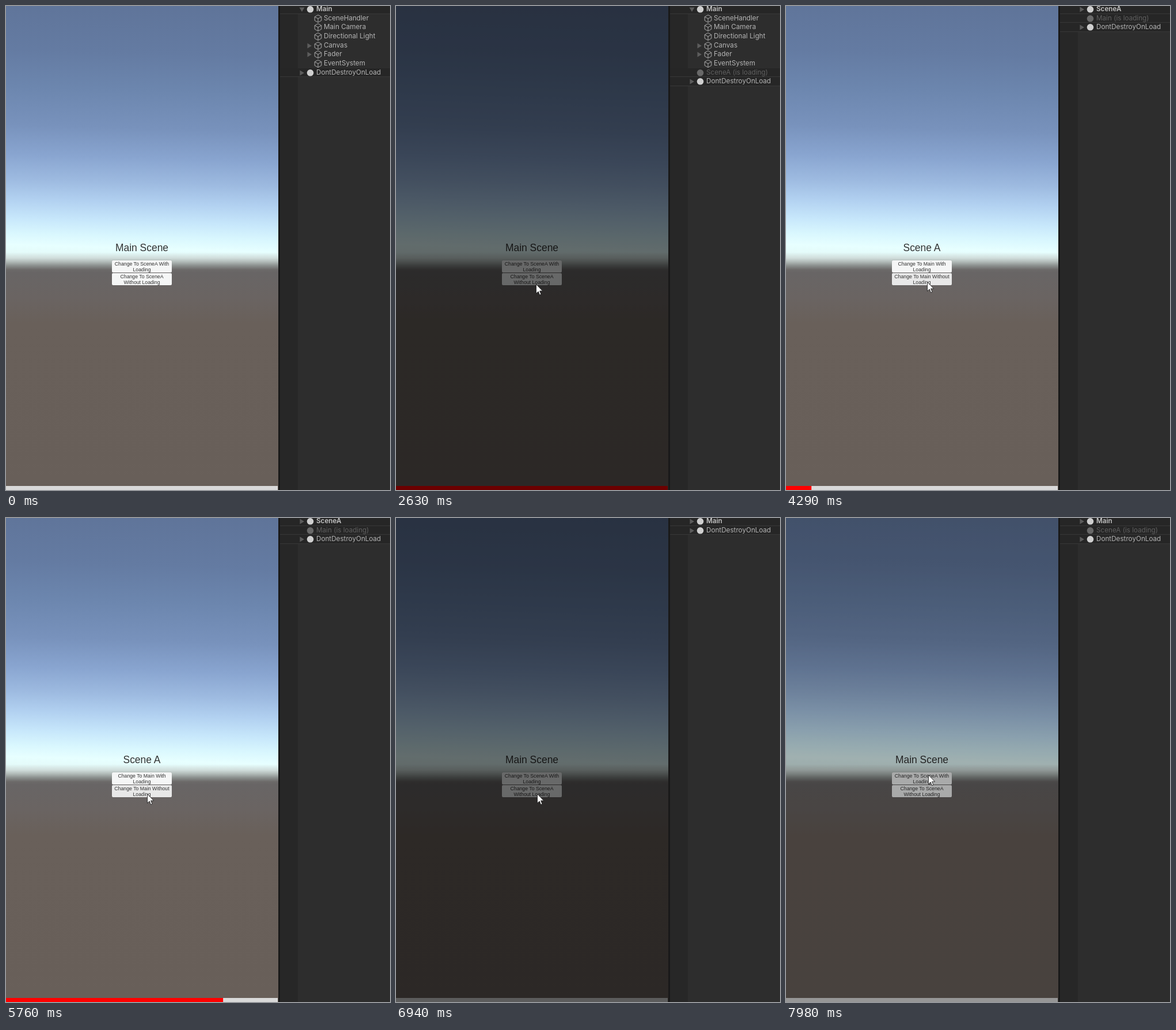
An HTML page that plays this animation: 667x839 px, repeating every 8000 ms.

```html
<!DOCTYPE html>
<html lang="en">
<head>
<meta charset="utf-8">
<title>Scene change</title>
<style>
  html, body { margin: 0; width: 100%; height: 100%; overflow: hidden; background: #2c2c2c; }
  #stage { position: relative; width: 667px; height: 839px; overflow: hidden; }
  #stage * { box-sizing: border-box; }
  .abs { position: absolute; }
  .anim { animation: 8s linear infinite; }

  /* Game view */
  #game { left: 0; top: 0; width: 473px; height: 839px; overflow: hidden; background:
    linear-gradient(180deg, transparent 427px, #d0dddb 437px, #aeb7b4 444px, #8b908e 450px, #6c6a69 457px, #686565 462px, #6a6462 505px, #69605a 550px, #685f59 839px),
    linear-gradient(181.7deg, #5f7499 0, #647ba2 88px, #6c86ae 152px, #7892bc 219px, #89a5d0 271px, #9dbae0 313px, #b1d0f0 347px, #c7e7fb 381px, #d9f7fe 407px, #e7ffff 427px, #e2f8f6 450px); }
  #scenes { left: 0; top: 0; animation-name: scenes; animation-timing-function: step-end; }
  .view { left: 0; top: 0; width: 473px; height: 839px; color: #323232;
    font-family: "Liberation Sans", Arial, sans-serif; text-align: center; }
  .view + .view { left: 473px; }
  .title { left: 0; top: 409px; width: 472px; font-size: 17.45px; line-height: 20px; white-space: nowrap; }
  .btn { left: 184px; width: 104px; height: 21px; border-radius: 2px; background: #f5f6f6;
    box-shadow: 0 0 1px rgba(60,60,60,.3); font-size: 8.73px; line-height: 10px; padding-top: .5px; white-space: nowrap; }
  .hover { animation-name: hover; animation-timing-function: step-end; }
  #track { left: 0; top: 831.5px; width: 472px; height: 7.5px; background: #d9d9d9; }
  #bar { left: 0; top: 0; width: 100%; height: 100%; background: #f00; transform-origin: 0 0; animation-name: load; }
  #fade { left: 0; top: 0; width: 473px; height: 839px; background: #000; animation-name: fade; }
  #cursor { left: 0; top: 0; overflow: visible; animation-name: cursor; }

  /* Hierarchy panel */
  #panel { left: 473px; top: 0; width: 194px; height: 839px; overflow: hidden;
    background: linear-gradient(90deg, #191919 3px, #272727 3px, #272727 34px, #2d2d2d 34px); }
  #lists { left: 0; top: 0; animation-name: lists; animation-timing-function: step-end; }
  .list { top: -1.9px; width: 194px; font: 11.7px Inter, sans-serif; color: #b4b4b4; }
  .row { position: relative; height: 15.65px; line-height: 15.65px; white-space: nowrap; }
  .row svg { position: absolute; left: 0; top: 0; width: 80px; height: 15.65px; }
  .row span { position: absolute; left: 79px; }
  .scene { margin-left: 3px; left: 0; background: #262626; border-bottom: 1px solid #383838; }
  .scene svg { left: -3px; }
  .scene span { left: 63px; }
  .open span { font-weight: 600; color: #c4c4c4; }
  .loading { color: #5f5f5f; }

  @keyframes scenes { 0% { transform: none; } 35.37% { transform: translateX(-473px); } 85.87%, 100% { transform: none; } }
  @keyframes hover { 0% { background: #f5f6f6; } 44.5% { background: #e8e8e8; } 85.87%, 100% { background: #f5f6f6; } }
  @keyframes load {
    0%, 13% { transform: scaleX(0); }
    26.94%, 35.37% { transform: scaleX(1); }
    35.38%, 51.2% { transform: scaleX(0); }
    77.25%, 85.87% { transform: scaleX(1); }
    85.88%, 100% { transform: scaleX(0); }
  }
  @keyframes fade {
    0%, 26.94% { opacity: 0; }
    33.75%, 35.37% { opacity: .66; }
    42.08%, 77.25% { opacity: 0; }
    84.25%, 85.87% { opacity: .66; }
    92.7%, 96.46% { opacity: 0; }
    100% { opacity: .334; }
  }
  @keyframes cursor {
    0%, 1.4% { transform: translate(458px, 845px); animation-timing-function: cubic-bezier(.3, .3, .5, 1); }
    9.5%, 44% { transform: translate(243px, 482px); }
    50%, 93% { transform: translate(245px, 478px); }
    95.6%, 100% { transform: translate(247px, 445px); }
  }
  @keyframes lists {
    0% { transform: none; }
    13% { transform: translateX(-194px); }
    35.37% { transform: translateX(-388px); }
    51.2% { transform: translateX(-582px); }
    85.87% { transform: translateX(-776px); }
    96.4%, 100% { transform: translateX(-970px); }
  }
</style>
</head>
<body>
<div id="stage">
  <div id="game" class="abs">
    <div id="scenes" class="abs anim">
      <div class="abs view">
        <div class="abs title">Main Scene</div>
        <div class="abs btn" style="top:441px">Change To SceneA With<br>Loading</div>
        <div class="abs btn" style="top:463px">Change To SceneA<br>Without Loading</div>
      </div>
      <div class="abs view">
        <div class="abs title">Scene A</div>
        <div class="abs btn" style="top:441px">Change To Main With<br>Loading</div>
        <div class="abs btn hover anim" style="top:463px">Change To Main Without<br>Loading</div>
      </div>
    </div>
    <div id="track" class="abs"><div id="bar" class="abs anim"></div></div>
    <div id="fade" class="abs anim"></div>
    <svg id="cursor" class="abs anim" width="12" height="20">
      <path d="M.5 .5V16.3L4.2 12.9 6.6 18.8 9 17.8 6.6 12H11.6Z" fill="#fff" stroke="#222" stroke-width=".9"/>
    </svg>
  </div>
  <div id="panel" class="abs"><div id="lists" class="abs anim"></div></div>
</div>
<script>
  const DOWN = x => `<path d="M${x - 4.5} 4.5h9l-4.5 7.5z" fill="#5c5c5c"/>`;
  const RIGHT = x => `<path d="M${x - 3.5} 3.5v9l7.5-4.5z" fill="#5c5c5c"/>`;
  const DOT = c => `<circle cx="55.5" cy="7.8" r="5.8" fill="${c}"/>`;
  const CUBE = '<path d="M69 1.6l5.8 3.1v6.5l-5.8 3.2-5.8-3.2V4.7zM63.2 4.7l5.8 3.2 5.8-3.2M69 7.9v6.5" fill="none" stroke="#aaa"/>';

  const row = (cls, art, text) => `<div class="row ${cls}"><svg>${art}</svg><span>${text}</span></div>`;
  const open = (name, arrow = RIGHT) => row('scene open', arrow(41) + DOT('#cfcfcf'), name);
  const loading = name => row('scene loading', DOT('#686868'), name + ' (is loading)');
  const child = (name, nested) => row('', (nested ? RIGHT(54) : '') + CUBE, name);

  const keep = row('scene', RIGHT(41) + DOT('#cfcfcf'), 'DontDestroyOnLoad');
  const main = open('Main', DOWN) + child('SceneHandler') + child('Main Camera') +
    child('Directional Light') + child('Canvas', true) + child('Fader', true) + child('EventSystem');

  const states = [
    main,
    main + loading('SceneA'),
    open('SceneA'),
    open('SceneA') + loading('Main'),
    open('Main'),
    open('Main') + loading('SceneA')
  ];
  document.getElementById('lists').innerHTML = states
    .map((rows, i) => `<div class="abs list" style="left:${i * 194}px">${rows}${keep}</div>`).join('');
</script>
</body>
</html>
```
